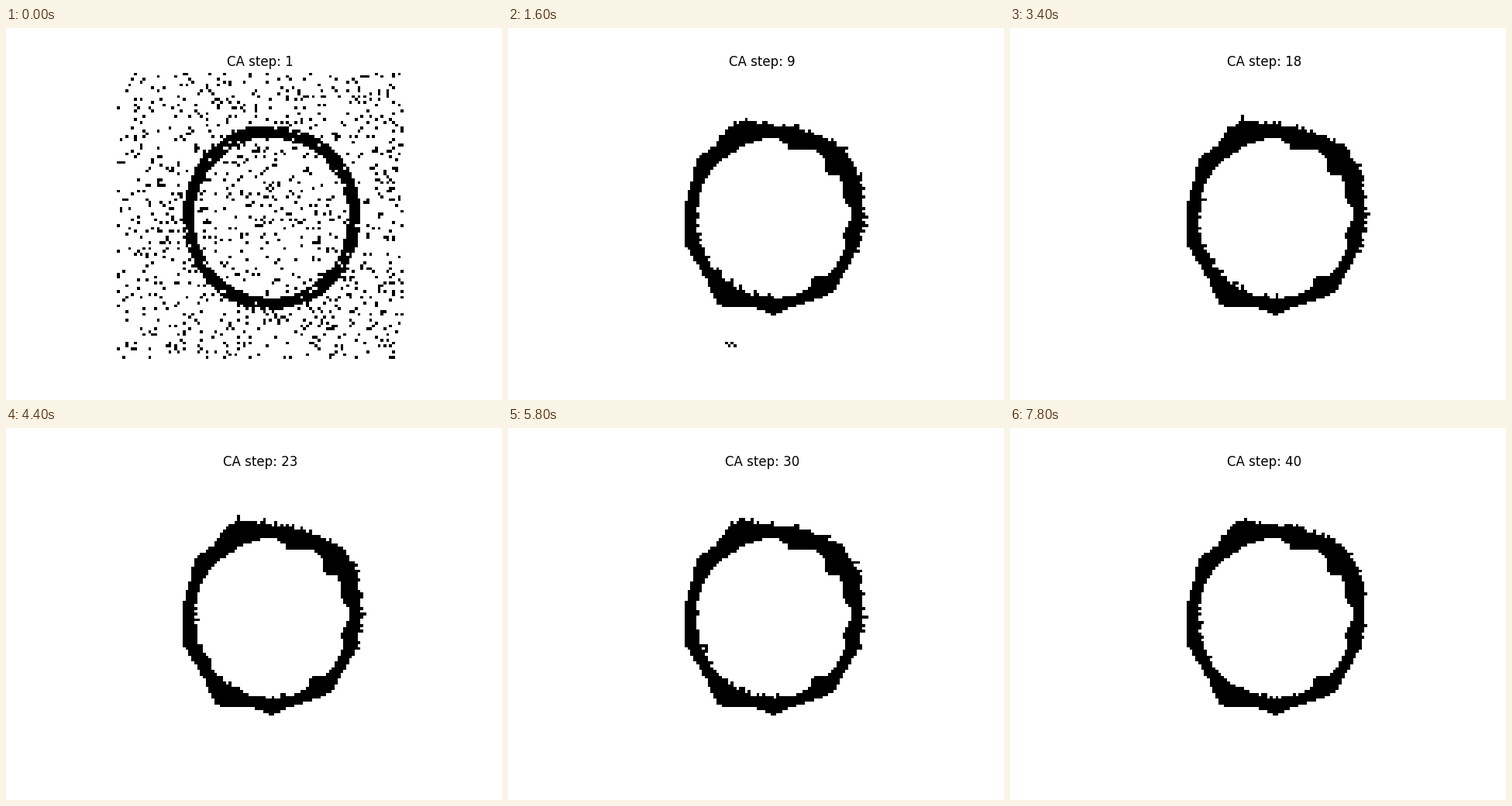
A matplotlib script for the animation above (8000 ms loop, 640 by 480 pixels).

```python
import numpy as np
import matplotlib.pyplot as plt
from matplotlib.animation import FuncAnimation

N, STEPS = 100, 40

# Polar coordinates of every cell around the ring's centre
Y, X = np.mgrid[:N, :N] + 0.5
DX, DY = X - 54, Y - 50.7
R = np.hypot(DX, DY)
ANGLE = np.degrees(np.arctan2(DY, DX))

# Bumps the ring grows: angle, width, height
OUTER_BUMPS = [(-112, 13, 3.5), (-142, 9, 2), (165, 7, 1.2), (122, 11, 4),
               (90, 7, 2), (52, 8, 1.5), (-40, 22, 2.4)]
INNER_BUMPS = [(-74, 9, -3.5), (-40, 6, -3), (-18, 8, -2), (12, 8, -2),
               (56, 6, -2.5), (-120, 25, -1)]

# Only edges that face up and to the right keep flickering
LIVE = np.where(R > 29, (ANGLE > -125) & (ANGLE < 25),
                (ANGLE > 75) | (ANGLE < -165))


def inside(rx, ry, bumps, growth):
    radius = R / np.hypot(DX / rx, DY / ry)
    for angle, width, height in bumps:
        d = (ANGLE - angle + 180) % 360 - 180
        radius += growth * height * np.exp(-(d / width) ** 2)
    return R < radius


def ring(step):
    growth = min(1, step / 9) ** 0.7
    return (inside(31, 32, OUTER_BUMPS, growth)
            & ~inside(27, 28, INNER_BUMPS, growth))


def rim(mask):
    """Free live cells just right of or just above the mask."""
    out = np.zeros_like(mask)
    out[:, 1:] |= mask[:, :-1]
    out[:-1] |= mask[1:]
    return out & ~mask & LIVE


def neighbours(mask):
    p = np.pad(mask.astype(int), 1)
    return p[:-2, 1:-1] + p[2:, 1:-1] + p[1:-1, :-2] + p[1:-1, 2:]


def evolve():
    rng = np.random.default_rng(7)

    def rand():
        return rng.random((N, N))

    noise, luck = rand() < 0.1, rand()
    grids = [np.where(ring(1), rand() > 0.06, noise)]
    for step in range(2, STEPS + 1):
        # Noise lives on where two side neighbours meet, with growing loss
        noise = (neighbours(noise) >= 2) & (rand() > 0.25 + 0.02 * step)
        luck = np.where(rand() < 0.2, rand(), luck)
        grid = ring(step)
        grid |= rim(grid) & (luck < 0.4)
        grid |= rim(grid) & (luck < 0.1 + 0.3 * np.exp(-step / 8))
        grids.append(grid | noise)
    return grids


grids = evolve()
fig, ax = plt.subplots(figsize=(6.4, 4.8), dpi=100)
image = ax.imshow(grids[0], cmap="binary", vmin=0, vmax=1,
                  interpolation="nearest")
title = ax.set_title("CA step: 1", fontsize=12)
ax.axis("off")


def update(i):
    image.set_data(grids[i])
    title.set_text(f"CA step: {i + 1}")
    return image, title


anim = FuncAnimation(fig, update, frames=STEPS, interval=200, repeat=True)
plt.show()
```
